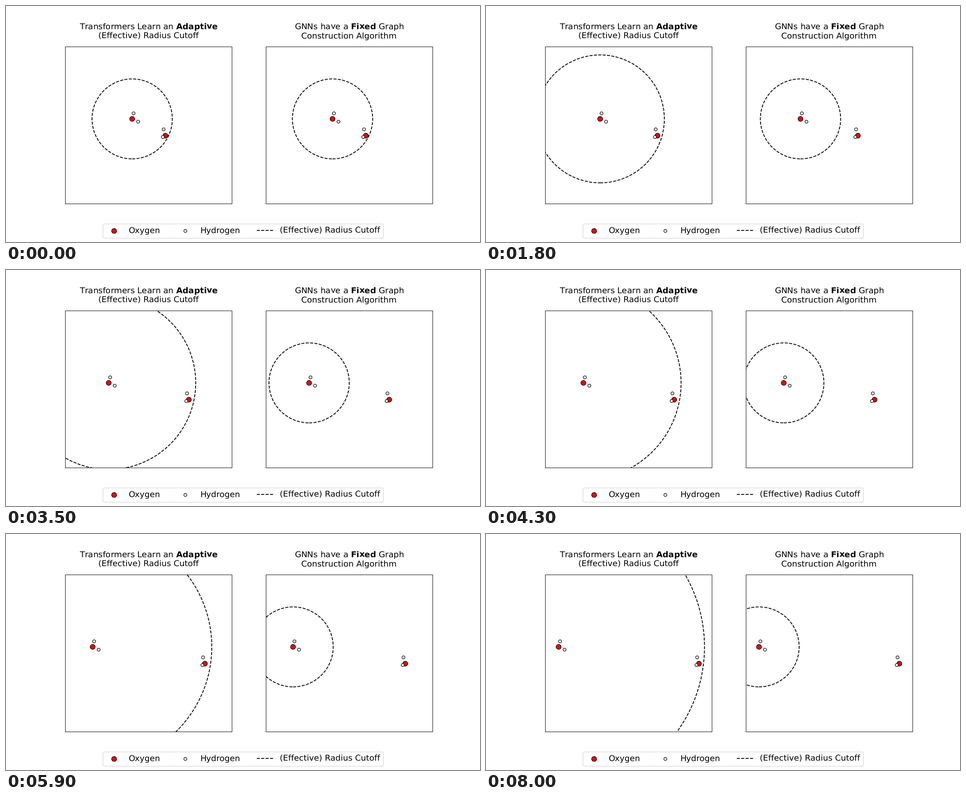
Write a matplotlib script that moves like this. It is 1058x529 px and loops after 10 s.

```python
import matplotlib.pyplot as plt
import numpy as np
from matplotlib.animation import FuncAnimation
from matplotlib.lines import Line2D
from matplotlib.patches import Circle

plt.rcParams["font.family"] = "DejaVu Sans"
plt.rcParams["text.hinting"] = "no_hinting"

STEPS = 80          # moving steps, followed by a hold
FRAMES = 100
SCALE = 29.87       # pixels per length unit
W, H = 0.3518, 0.6647
R0, R_MAX = 3.0, 10.9

# Two water molecules: the left one drifts left, the right one right.
OXYGEN = np.array([[0, 0], [2.485, -1.259]])
HYDROGEN = np.array([[0.105, 0.415], [0.445, -0.21],
                     [2.352, -0.787], [2.295, -1.363]])
O_DRIFT = np.array([[-1, 0], [1, 0]])
H_DRIFT = np.repeat(O_DRIFT, 2, axis=0)

fig = plt.figure(figsize=(12, 6), dpi=88.167, facecolor="white")


def add_atoms(ax, points, size, color, label):
    # One colour per point keeps the markers off the pixel grid.
    return ax.scatter(*points.T, s=size, c=[color] * len(points),
                      edgecolors="black", linewidths=1, label=label)


def make_panel(left, line1, line2):
    ax = fig.add_axes([left, 0.495 - H / 2, W, H])
    top = 161.7 / SCALE
    ax.set_xlim(-5, W * 1058 / SCALE - 5)
    ax.set_ylim(top - H * 529 / SCALE, top)
    ax.set_xticks([])
    ax.set_yticks([])
    for text, rise in ((line1, 32.1), (line2, 15)):
        ax.annotate(text, (0.5, 1), xycoords="axes fraction",
                    xytext=(0, rise), textcoords="offset points",
                    ha="center", va="baseline", fontsize=15)
    oxy = add_atoms(ax, OXYGEN, 80, "red", "Oxygen")
    hyd = add_atoms(ax, HYDROGEN, 30, "white", "Hydrogen")
    ring = Circle((0, 0), R0, fill=False, ls="--", lw=1.5, ec="black")
    ax.add_patch(ring)
    return oxy, hyd, ring


adaptive = make_panel(0.125, r"Transformers Learn an $\bf{Adaptive}$",
                      "(Effective) Radius Cutoff")
fixed = make_panel(0.54773, r"GNNs have a $\bf{Fixed}$ Graph",
                   "Construction Algorithm")

cutoff = Line2D([0], [0], color="black", ls="--", lw=1.5,
                label="(Effective) Radius Cutoff")
fig.legend(handles=[adaptive[0], adaptive[1], cutoff],
           loc="lower center", ncol=3, fontsize=15, borderaxespad=0.48)


def update(i):
    n = min(i, STEPS)
    shift = 0.05 * n
    for oxy, hyd, ring in (adaptive, fixed):
        oxy.set_offsets(OXYGEN + shift * O_DRIFT)
        hyd.set_offsets(HYDROGEN + shift * H_DRIFT)
        ring.center = (-shift, 0)
    adaptive[2].set_radius(min(R0 + 0.1 * n, R_MAX))
    return adaptive + fixed


anim = FuncAnimation(fig, update, frames=FRAMES, interval=100,
                     repeat=True, repeat_delay=0, blit=False)
plt.show()
```
